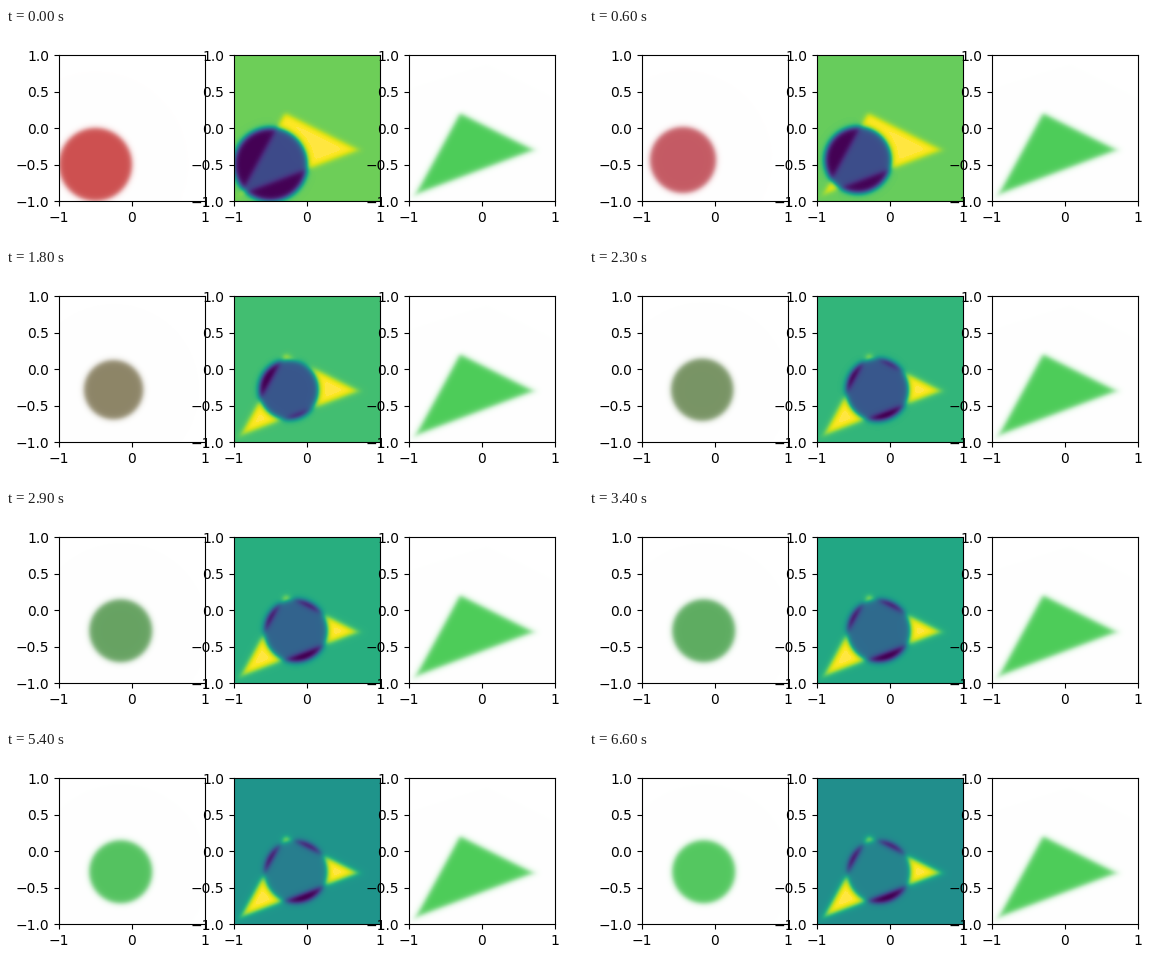
A matplotlib script that plays this animation: 577x213 px, repeating every 6800 ms.

```python
import numpy as np
import matplotlib.pyplot as plt
from matplotlib.animation import FuncAnimation

WIDTH, HEIGHT, DPI = 577, 213, 100
FRAMES, INTERVAL = 68, 100
LEFT, BOTTOM = 52.88, 39.7   # first panel's corner in pixels
SIDE, STEP = 145.88, 175.06  # panel size and spacing in pixels
SOFTNESS = 0.021
SPEED = 0.0155               # circle drift per frame on each axis
GREEN = np.array([77, 204, 89]) / 255
TRIANGLE = [(-0.9, -0.9), (0.7, -0.3), (-0.3, 0.2)]  # counterclockwise

axis = (np.arange(200) + 0.5) / 100 - 1
X, Y = np.meshgrid(axis, axis)


def inside(distance):
    """Soft coverage for a signed distance, negative inside."""
    return 1 / (1 + np.exp(np.clip(distance / SOFTNESS, -50, 50)))


def paint(alpha, color):
    return 1 + alpha[..., None] * (color - 1)


def triangle_alpha():
    alpha = np.ones_like(X)
    for (x0, y0), (x1, y1) in zip(TRIANGLE, TRIANGLE[1:] + TRIANGLE[:1]):
        dx, dy = x1 - x0, y1 - y0
        alpha *= inside(((X - x0) * dy - (Y - y0) * dx) / np.hypot(dx, dy))
    return alpha


def settle(t, start, end, scale, power):
    return end + (start - end) * np.exp(-(t / scale) ** power)


def circle_image(frame):
    # The optimiser pauses for one frame out of twenty.
    t = max(frame - (frame % 20 == 15) - 2, 0)
    x = min(-0.5 + SPEED * t, -0.154)
    y = min(-0.5 + SPEED * t, -0.284)
    radius = np.interp(t, [0, 10, 22], [0.5, 0.38, 0.43])
    red = settle(t, 205, 84, 19, 1.7)
    green = settle(t, 80, 204, 25, 1.3)
    blue = 96 + (5.8 * t - 16) * np.exp(-t / 7)
    color = np.array([red, green, blue]) / 255
    return paint(inside(np.hypot(X - x, Y - y) - radius), color)


def add_panel(index, image):
    ax = fig.add_axes([(LEFT + index * STEP) / WIDTH, BOTTOM / HEIGHT,
                       SIDE / WIDTH, SIDE / HEIGHT])
    artist = ax.imshow(image, extent=(-1, 1, -1, 1), origin="lower",
                       cmap=cmap)
    ax.set_xticks([-1, 0, 1])
    ax.set_yticks([-1, -0.5, 0, 0.5, 1])
    return artist


plt.rcParams["font.family"] = "DejaVu Sans"
cmap = plt.get_cmap("viridis").with_extremes(over="#ffe640")
fig = plt.figure(figsize=(WIDTH / DPI, HEIGHT / DPI), dpi=DPI,
                 facecolor="white")
target = paint(triangle_alpha(), GREEN)
guess_panel = add_panel(0, target)
error_panel = add_panel(1, target[..., 1])
add_panel(2, target)


def update(frame):
    guess = circle_image(frame)
    error = guess[..., 1] - target[..., 1]
    guess_panel.set_data(guess)
    error_panel.set_data(error)
    error_panel.set_clim(error.min(), 0.98 * error.max())
    return guess_panel, error_panel


animation = FuncAnimation(fig, update, frames=FRAMES, interval=INTERVAL,
                          repeat=True, repeat_delay=0)
plt.show()
```
